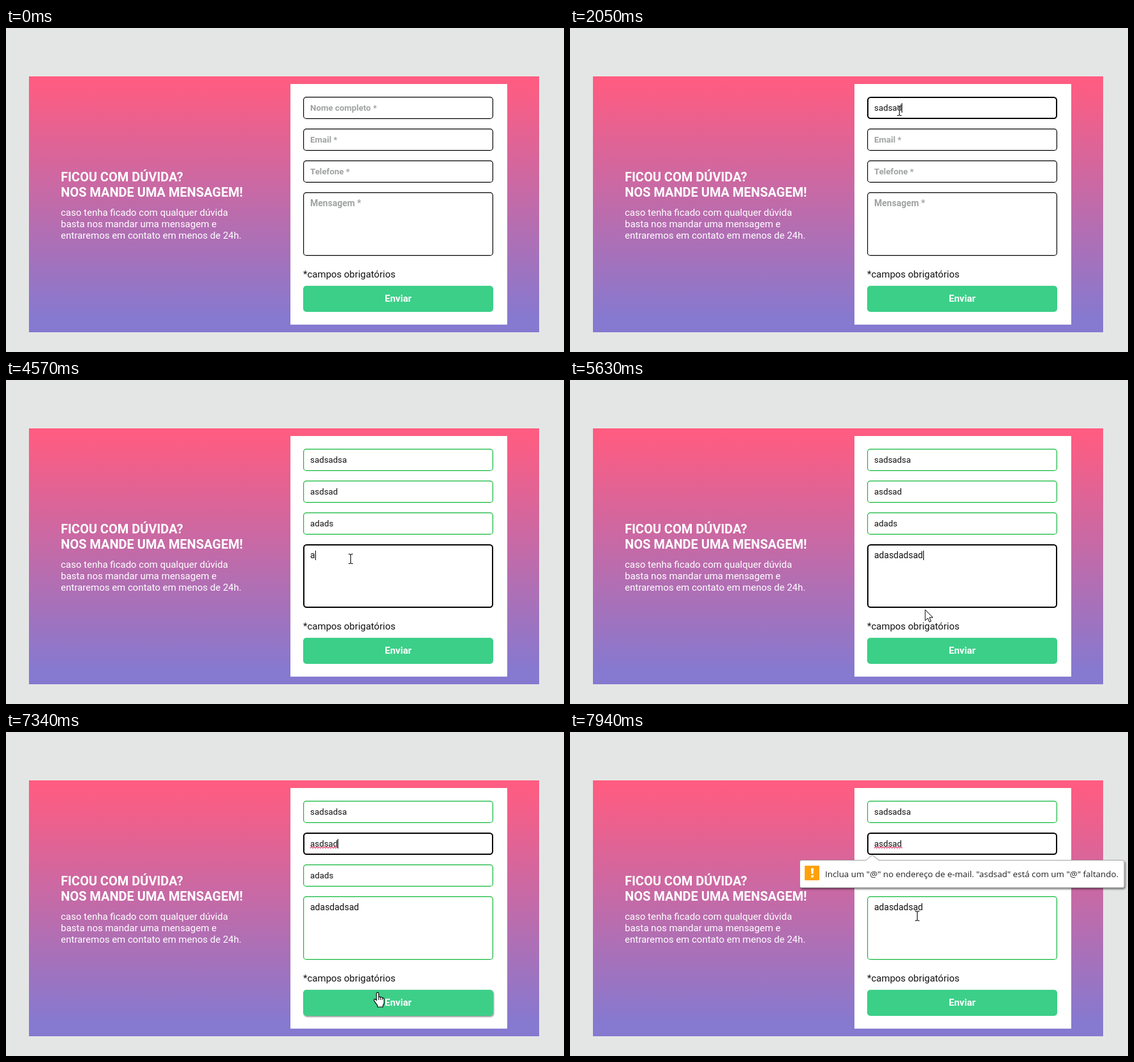
Write an HTML page that moves like this. It is 875 px wide and 509 px high and loops after 8000 ms.

```html
<!DOCTYPE html>
<html lang="pt-BR">
<head>
<meta charset="utf-8">
<title>Formulário de contato</title>
<style>
html, body { margin: 0; width: 100%; height: 100%; overflow: hidden; background: #e4e6e5; }
svg { display: block; width: 875px; height: 509px; font-family: Roboto, sans-serif; }
text { white-space: pre; }
.bold { font-weight: 700; }
</style>
</head>
<body>
<svg id="stage" viewBox="0 0 875 509" xmlns="http://www.w3.org/2000/svg">
  <defs>
    <linearGradient id="sunset" x1="0" y1="0" x2="0" y2="1">
      <stop offset="0.02" stop-color="#ff5c81"/>
      <stop offset="0.95" stop-color="#8579d0"/>
    </linearGradient>
    <filter id="buttonShadow" x="-5%" y="-20%" width="110%" height="150%">
      <feDropShadow dx="1" dy="1.5" stdDeviation="1.3" flood-opacity="0.45"/>
    </filter>
    <filter id="bubbleShadow" x="-5%" y="-20%" width="110%" height="150%">
      <feDropShadow dx="1.5" dy="2" stdDeviation="1.6" flood-opacity="0.5"/>
    </filter>
  </defs>
  <rect width="875" height="509" fill="#e4e6e5"/>
  <rect x="36" y="76" width="800" height="402" fill="url(#sunset)"/>
  <g fill="#fff">
    <g class="bold" font-size="20">
      <text x="86" y="241">FICOU COM DÚVIDA?</text>
      <text x="86" y="265">NOS MANDE UMA MENSAGEM!</text>
    </g>
    <g font-size="15">
      <text x="86" y="295">caso tenha ficado com qualquer dúvida</text>
      <text x="86" y="313">basta nos mandar uma mensagem e</text>
      <text x="86" y="331">entraremos em contato em menos de 24h.</text>
    </g>
    <rect x="446" y="88" width="340" height="378"/>
  </g>
  <g id="fields"></g>
  <text x="466" y="392" font-size="15" fill="#111">*campos obrigatórios</text>
  <rect id="button" x="466" y="405" width="298" height="41" rx="5" fill="#3ccf88"/>
  <text class="bold" x="615" y="430" font-size="15" fill="#fff" text-anchor="middle">Enviar</text>
  <path id="squiggle" fill="none" stroke="#e0406f" stroke-width="1.1"/>
  <rect id="caret" width="1" height="15" fill="#000"/>
  <g id="bubble">
    <path d="M363 201.5H464L474 193.5L484 201.5H866.5a2.5 2.5 0 0 1 2.5 2.5V242a2.5 2.5 0 0 1-2.5 2.5H363a2.5 2.5 0 0 1-2.5-2.5V204a2.5 2.5 0 0 1 2.5-2.5Z"
      fill="#fff" stroke="#a6a6a6" filter="url(#bubbleShadow)"/>
    <rect x="368" y="210" width="23" height="23" rx="1" fill="#ffa10a"/>
    <path d="M378 214h4l-.6 9h-2.8ZM378.2 225h3.6v3.4h-3.6Z" fill="#fff"/>
    <text x="400" y="228" font-size="13.35" fill="#222" font-family="'Open Sans', 'Noto Sans', sans-serif">Inclua um "@" no endereço de e-mail. "asdsad" está com um "@" faltando.</text>
  </g>
  <g id="cursor">
    <path id="arrow" d="M0 0V17L4 13.2L6.6 19.2L9.2 18.1L6.6 12.2H12Z" fill="#fff" stroke="#000"/>
    <g id="beam" fill="none">
      <path d="M-3.5-7.5H-1.5L0-6.5L1.5-7.5H3.5M0-6.5V6.5M-3.5 7.5H-1.5L0 6.5L1.5 7.5H3.5" stroke="#fff" stroke-width="2.6" opacity=".7"/>
      <path d="M-3.5-7.5H-1.5L0-6.5L1.5-7.5H3.5M0-6.5V6.5M-3.5 7.5H-1.5L0 6.5L1.5 7.5H3.5" stroke="#111" stroke-width="1.1"/>
    </g>
    <g id="hand">
      <path d="M-1.5 1.5a1.6 1.6 0 0 1 3.2 0V7.5q1.6-1.2 3 .3q1.7-.9 2.9.6q2.4-.5 2.9 1.9V16q0 2.5-1.8 4.5V23H.5V20.8Q-2-18 -2-18" fill="none"/>
      <path d="M-1.5 1.8a1.7 1.7 0 0 1 3.4 0V7.3q1.7-1 2.9.5q1.8-.8 2.9.8q2.6-.2 2.7 2.2V16q0 2.4-1.9 4.6V23H0V20.6L-5 13.6q-1.3-2.1.4-2.9q1.4-.4 3.1 2Z"
        fill="#fff" stroke="#000" stroke-width="1.1" stroke-linejoin="round"/>
      <path d="M1.9 7.5V12M4.8 8V12M7.7 8.8V12" stroke="#000"/>
    </g>
  </g>
</svg>
<script>
const LOOP = 8000;
const NS = "http://www.w3.org/2000/svg";
const $ = id => document.getElementById(id);
const TEXT_X = 477;

// keys: moment each character is typed; focus: [start, end] spans
const fields = [
  { y: 108, h: 35, size: 13.333, label: "Nome completo *", value: "sadsadsa",
    keys: [1380, 1580, 1780, 1920, 1980, 2045, 2180, 2250], focus: [[1020, 2560]] },
  { y: 158, h: 35, size: 13.333, label: "Email *", value: "asdsad",
    keys: [2700, 2780, 2850, 2910, 2980, 3050], focus: [[2560, 3500], [7280, LOOP]] },
  { y: 208, h: 35, size: 13.333, label: "Telefone *", value: "adads",
    keys: [3640, 3770, 3840, 3910, 4040], focus: [[3500, 4370]] },
  { y: 258, h: 100, size: 14, label: "Mensagem *", value: "adasdadsad",
    keys: [4510, 4700, 4830, 4970, 5100, 5200, 5300, 5400, 5500, 5600], focus: [[4370, 6820]] }
];

// [time, x, y] of the pointer hotspot
const pointerPath = [
  [250, 814, 512], [1060, 514, 128], [1120, 516.5, 130], [2290, 516.5, 130],
  [2710, 547.5, 271], [3700, 547.5, 271], [4300, 540.5, 281], [5480, 540.5, 281],
  [5760, 570, 424], [6000, 570, 424], [6400, 544.5, 406], [6450, 544.5, 406],
  [6800, 575, 408], [7200, 582.5, 409], [7620, 582.5, 409], [7930, 544.5, 289], [LOOP, 544.5, 289]
];

function add(parent, tag, attrs) {
  const el = document.createElementNS(NS, tag);
  set(el, attrs);
  parent.append(el);
  return el;
}

function set(el, attrs) {
  for (const name in attrs) el.setAttribute(name, attrs[name]);
}

function show(el, visible) {
  el.style.display = visible ? "" : "none";
}

for (const f of fields) {
  f.box = add($("fields"), "rect", { fill: "#fff" });
  f.text = add($("fields"), "text", { x: TEXT_X, y: f.y + 22, "font-size": f.size });
}

const waves = Array.from({ length: 11 }, (_, i) => `L${TEXT_X + 2 + i * 4} 180.5L${TEXT_X + 4 + i * 4} 182.5`);
$("squiggle").setAttribute("d", `M${TEXT_X} 182.5${waves.join("")}`);

const inside = (x, y, left, top, w, h) => x >= left && x <= left + w && y >= top && y <= top + h;

function pointerAt(t) {
  const i = Math.max(1, pointerPath.findIndex(p => p[0] > t));
  const [t0, x0, y0] = pointerPath[i - 1];
  const [t1, x1, y1] = pointerPath[i];
  const u = Math.min(1, Math.max(0, (t - t0) / (t1 - t0)));
  const k = u * u * (3 - 2 * u);
  return [x0 + (x1 - x0) * k, y0 + (y1 - y0) * k];
}

function drawField(f, t) {
  const count = f.keys.filter(k => k <= t).length;
  const span = f.focus.find(([start, end]) => t >= start && t < end);
  const stroke = span ? 2 : 1.2;
  set(f.box, {
    x: 466 + stroke / 2, y: f.y + stroke / 2, width: 298 - stroke, height: f.h - stroke, rx: 4.5,
    stroke: !span && count ? "#12b83c" : "#050505", "stroke-width": stroke
  });
  f.text.textContent = count ? f.value.slice(0, count) : f.label;
  set(f.text, { fill: count ? "#111" : "#a0a2a2", class: count ? "" : "bold" });
  if (!span) return;

  const lastAction = Math.max(span[0], ...f.keys.filter(k => k <= t));
  show($("caret"), Math.floor((t - lastAction) / 500) % 2 === 0);
  const width = count ? f.text.getComputedTextLength() : 0;
  set($("caret"), { x: Math.round(TEXT_X + width), y: f.y + 10 });
}

function drawPointer(t) {
  const [x, y] = pointerAt(t);
  const overButton = inside(x, y, 466, 405, 298, 41);
  const overText = inside(x, y, 466, 378, 145, 18) || fields.some(f => inside(x, y, 466, f.y, 298, f.h));
  set($("cursor"), { transform: `translate(${x} ${y})` });
  show($("cursor"), t >= 260);
  show($("hand"), overButton);
  show($("beam"), overText);
  show($("arrow"), !overButton && !overText);
  $("button").setAttribute("filter", overButton ? "url(#buttonShadow)" : "none");
}

function render(t) {
  show($("caret"), false);
  fields.forEach(f => drawField(f, t));
  drawPointer(t);
  show($("squiggle"), t >= 7280);
  $("bubble").setAttribute("opacity", Math.min(1, Math.max(0, (t - 7350) / 270)));
}

const start = performance.now();
function tick() {
  render((performance.now() - start) % LOOP);
  requestAnimationFrame(tick);
}
tick();
</script>
</body>
</html>
```
